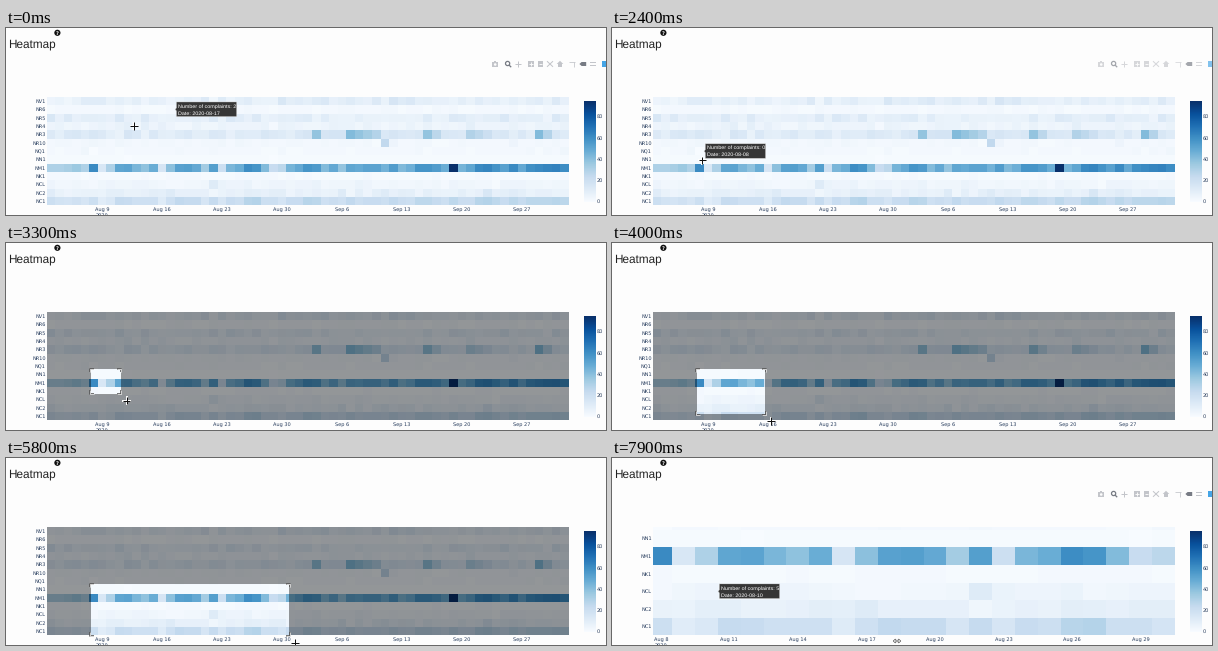
These frames come from a looping animation (600x187 px, 8 s). A matplotlib script:

```python
import matplotlib.pyplot as plt
import numpy as np
from matplotlib.animation import FuncAnimation
from matplotlib.patches import Circle, PathPatch, Polygon, Rectangle
from matplotlib.path import Path

W, H, DPI = 600, 187, 100
FRAMES, STEP = 80, 100
plt.rcParams["text.hinting"] = "none"
plt.rcParams["font.family"] = "DejaVu Sans"

# Plot area and data size
LEFT, RIGHT, TOP, BOTTOM = 40.5, 563, 68.9, 177.4
ROWS = "NV1 NR6 NR5 NR4 NR3 NR10 NQ1 NN1 NM1 NK1 NCL NC2 NC1".split()
MEANS = [9, 2, 9, 5, 11, 2.5, 2, 0.8, 1, 1.5, 4, 8, 1]
DAYS, ZMAX = 61, 95
DAY0 = np.datetime64("2020-08-03")
PAGE, INK, GREY, DARK = "#fdfdfd", "#2a3f5f", "#c3c5ca", "#777b84"

# Timeline in ms
FADE, DRAG, RELEASE, HOVER_LAG = 2300, 2600, 7500, 200
START = (84.5, 126)
MIN_ZOOM = 7.5
CURSOR_KEYS = np.array([
    (-200, 171, 89), (0, 128, 98), (700, 88, 131), (1500, 88, 131), (1800, 90, 131.8),
    (2500, 90.5, 132.5), (2800, 93, 143), (4000, 159, 178), (5800, 289, 184.5),
    (7400, 286.4, 185), (7600, 285, 183)])


def make_data():
    rng = np.random.default_rng(8)
    z = np.array([rng.gamma(14, m / 14, DAYS) for m in MEANS])
    day = np.arange(DAYS)

    # Weekly rhythm from Monday to Sunday, weaker later in the season
    week = np.resize([-3, 8, 12, 6, -3, 12, -24], DAYS)
    week = week * np.interp(day, [0, 7, 24, 34], [0.2, 1, 1, 0.45])
    noise = rng.normal(0, 3, DAYS)
    z[ROWS.index("NM1")] = np.interp(day, [0, 6, 30, 60], [26, 38, 46, 60]) + week + noise
    z[ROWS.index("NC1")] = np.interp(day, [0, 20, 60], [17, 21, 26]) + 0.3 * week + 0.7 * noise

    # Bursts that tail off
    z[4, 30:] += 4
    for start, span, top in [(31, 1, 38), (35, 4, 42), (44, 2, 38), (49, 3, 30), (57, 2, 42)]:
        z[4, start:start + span] = np.linspace(top, 0.7 * top, span)
    marks = [(5, 39, 25), (8, 5, 62), (8, 26, 23), (8, 47, 95),
             (1, 14, 2), (6, 4, 4), (6, 5, 0), (10, 7, 5), (10, 19, 12)]
    for row, d, v in marks:
        z[row, d] = v
    return np.rint(z)


Z = make_data()
fig = plt.figure(figsize=(W / DPI, H / DPI), dpi=DPI, facecolor=PAGE)
ax = fig.add_axes([0, 0, 1, 1])


def text(x, y, s, size=5, color=INK, ha="center", font="DejaVu Sans", z=3, weight="normal"):
    ax.text(x, y + 0.36 * size, s, fontsize=size * 72 / DPI, color=color, ha=ha,
            va="baseline", family=font, zorder=z, weight=weight)


def line(xs, ys, color, lw=1.0, z=3):
    ax.plot(xs, ys, color=color, lw=lw * 72 / DPI, zorder=z, solid_capstyle="butt")


def box(x, y, w, h, color, z=3, alpha=1):
    ax.add_patch(Rectangle((x, y), w, h, fc=color, lw=0, zorder=z, alpha=alpha))


def cursor(t):
    times, xs, ys = CURSOR_KEYS.T
    return np.interp(t, times, xs), np.interp(t, times, ys)


def pointer(t):
    x, y = cursor(t)
    return x - 6, min(y - 7, BOTTOM)


class View:
    """Maps days and rows to pixels, zoomed to a box of the full plot."""

    def __init__(self, x0=LEFT, y0=TOP, x1=RIGHT, y1=BOTTOM):
        sx, sy = (RIGHT - LEFT) / (x1 - x0), (BOTTOM - TOP) / (y1 - y0)
        self.w = (RIGHT - LEFT) / DAYS * sx
        self.h = (BOTTOM - TOP) / len(ROWS) * sy
        self.x0 = LEFT - (x0 - LEFT) * sx
        self.y0 = TOP - (y0 - TOP) * sy

    def x(self, day):
        return self.x0 + day * self.w

    def y(self, row):
        return self.y0 + row * self.h

    def cell(self, x, y):
        return int((y - self.y0) / self.h), int((x - self.x0) / self.w)


FULL = View()
ZOOMED = View(*START, *pointer(RELEASE - STEP))


def draw_header():
    text(1.8, 15.2, "Heatmap", 11.7, "#222222", "left", "Liberation Sans")
    ax.add_patch(Circle((51.4, 4.8), 3.1, fc="#111111", lw=0))
    text(51.4, 4.8, "?", 5, "white", weight="bold")


def draw_colorbar():
    ramp = np.linspace(1, 0, 101)[:, None]
    ax.imshow(ramp, cmap="Blues", extent=(577.5, 589.5, 173.6, 72.8), aspect="auto", zorder=2)
    for v in range(0, 81, 20):
        text(590.7, 173.4 - v * 1.06, str(v), ha="left")


def draw_modebar(alpha):
    y = 36
    # camera
    box(486, y - 1.8, 6.4, 4.6, GREY)
    box(488, y - 2.8, 2.4, 1.2, GREY)
    ax.add_patch(Circle((489.2, y + 0.5), 1.3, fc=PAGE, lw=0, zorder=4))
    # magnifier
    ax.add_patch(Circle((501.6, y - 0.5), 2.1, fc=PAGE, ec=DARK, lw=0.9, zorder=3))
    line([503, 505.2], [y + 1, y + 3.2], DARK, 1.3)
    # pan
    line([508.8, 515.2], [y, y], GREY)
    line([512, 512], [y - 3.2, y + 3.2], GREY)
    # zoom in and out
    for x in (522, 531.5):
        box(x, y - 2.9, 5.8, 5.8, GREY)
        line([x + 1.3, x + 4.5], [y, y], PAGE, 0.9, 4)
    line([524.9, 524.9], [y - 1.6, y + 1.6], PAGE, 0.9, 4)
    # autoscale
    for s in (-1, 1):
        line([541, 547], [y - 2.8 * s, y + 2.8 * s], GREY)
    # home
    ax.add_patch(Polygon([(550.7, y), (554, y - 3.2), (557.3, y)], fc=GREY, lw=0))
    box(551.7, y, 4.6, 2.8, GREY)
    # spike lines
    line([563, 568.6], [y - 2.5, y - 2.5], GREY, 0.8)
    line([568, 568], [y - 2.5, y + 3], GREY, 0.8)
    # hover modes
    ax.add_patch(Polygon([(573.4, y), (575.6, y - 2), (580.2, y - 2), (580.2, y + 2),
                          (575.6, y + 2)], fc=DARK, lw=0))
    for dy in (-1.6, 1.4):
        box(584, y + dy - 0.9, 5.6, 1.8, GREY)
    box(595.5, y - 3, 6, 6, "#45a5e6")
    # veil for fading out
    box(484, y - 5, W - 484, 10, PAGE, 8, 1 - alpha)


def ring(x0, y0, x1, y1):
    return [(x0, y0), (x1, y0), (x1, y1), (x0, y1), (x0, y0)]


def draw_heatmap(view, ticks):
    xs = view.x(np.arange(DAYS + 1))
    ys = view.y(np.arange(len(ROWS) + 1))
    mesh = ax.pcolormesh(xs, ys, Z, cmap="Blues", vmin=0, vmax=ZMAX, zorder=1)
    mesh.set_clip_path(Path(ring(LEFT, TOP, RIGHT, BOTTOM)), ax.transData)
    for i, name in enumerate(ROWS):
        y = view.y(i + 0.5)
        if y > TOP:
            text(39.8, y, name, ha="right")
    for n, day in enumerate(ticks):
        x = view.x(day + 0.5)
        _, month, date = str(DAY0 + day).split("-")
        text(x, 181, f"{'Aug' if month == '08' else 'Sep'} {int(date)}")
        if n == 0:
            text(x, 187.3, "2020")


def draw_tooltip(view, row, day):
    x, y = view.x(day + 1), view.y(row + 0.5)
    l, r, t, b = x + 1.3, x + 61.8, y - 7.5, y + 7.3
    ax.add_patch(Polygon([(x, y), (l, y - 1.4), (l, t), (r, t), (r, b), (l, b), (l, y + 1.4)],
                         fc="#363636", ec="#f4f4f4", lw=0.3, zorder=6))
    lines = f"Number of complaints: {Z[row, day]:.0f}", f"Date: {DAY0 + day}"
    for s, dy in zip(lines, (-3.6, 3.2)):
        text(x + 2.8, y + dy, s, 5.32, "white", "left", "Liberation Sans", 7)


def draw_selection(t):
    (x0, y0), (x1, y1) = START, pointer(t)
    dx, dy = x1 - x0, y1 - y0
    band = dx < min(0.6 * dy, MIN_ZOOM)
    l, r = (LEFT, RIGHT) if band else (x0, x1)
    codes = [Path.MOVETO] + [Path.LINETO] * 3 + [Path.CLOSEPOLY]
    verts = ring(LEFT, TOP, RIGHT, BOTTOM) + ring(l, y0, r, y1)[::-1]
    alpha = 0.4 * min(1, (t - DRAG + STEP) / 200)
    ax.add_patch(PathPatch(Path(verts, codes * 2), fc="black", alpha=alpha, lw=0, zorder=4))
    if band:
        for y in (y0 - 0.6, y1 + 0.6):
            line([x0 - MIN_ZOOM, x0 + MIN_ZOOM], [y, y], "#555555", 1.5, 5)
            line([x0 - MIN_ZOOM + 0.4, x0 + MIN_ZOOM - 0.4], [y, y], "white", 0.7, 5)
        return
    n = min(MIN_ZOOM, dx, dy) / 2
    for x, sx in ((l - 0.5, 1), (r + 0.5, -1)):
        for y, sy in ((y0 - 0.5, 1), (y1 + 0.5, -1)):
            path = [x + sx * n, x, x], [y, y, y + sy * n]
            line(*path, "#555555", 1.6, 5)
            line(*path, "white", 0.7, 5)


def draw_cross(x, y):
    for color, lw, n in (("white", 1.9, 4.3), ("#111111", 1.0, 3.9)):
        line([x - n, x + n], [y, y], color, lw, 9)
        line([x, x], [y - n, y + n], color, lw, 9)


def draw_resize(x, y):
    arrow = [(-3.8, 0), (-1.6, -2), (-1.6, -0.8), (1.6, -0.8), (1.6, -2),
             (3.8, 0), (1.6, 2), (1.6, 0.8), (-1.6, 0.8), (-1.6, 2)]
    ax.add_patch(Polygon([(x + a, y + b) for a, b in arrow], fc="white", ec="#444444",
                         lw=0.45, zorder=9))


def draw(i):
    t = i * STEP
    dragging, zoomed = DRAG <= t < RELEASE, t >= RELEASE
    ax.clear()
    draw_header()
    draw_colorbar()
    if zoomed:
        draw_heatmap(ZOOMED, range(5, 28, 3))
        draw_tooltip(ZOOMED, ROWS.index("NCL"), 7)
        draw_resize(*cursor(t))
    else:
        draw_heatmap(FULL, range(6, DAYS, 7))
        if dragging:
            draw_selection(t)
        else:
            draw_tooltip(FULL, *FULL.cell(*pointer(t - HOVER_LAG)))
        draw_cross(*cursor(t))
    if not dragging:
        draw_modebar(1 if zoomed else np.interp(t, [FADE, DRAG], [1, 0]))
    ax.set_xlim(0, W)
    ax.set_ylim(H, 0)
    ax.set_aspect("auto")
    ax.axis("off")
    return []


anim = FuncAnimation(fig, draw, frames=FRAMES, interval=STEP, init_func=lambda: [],
                     repeat=True, repeat_delay=0)
plt.show()
```
